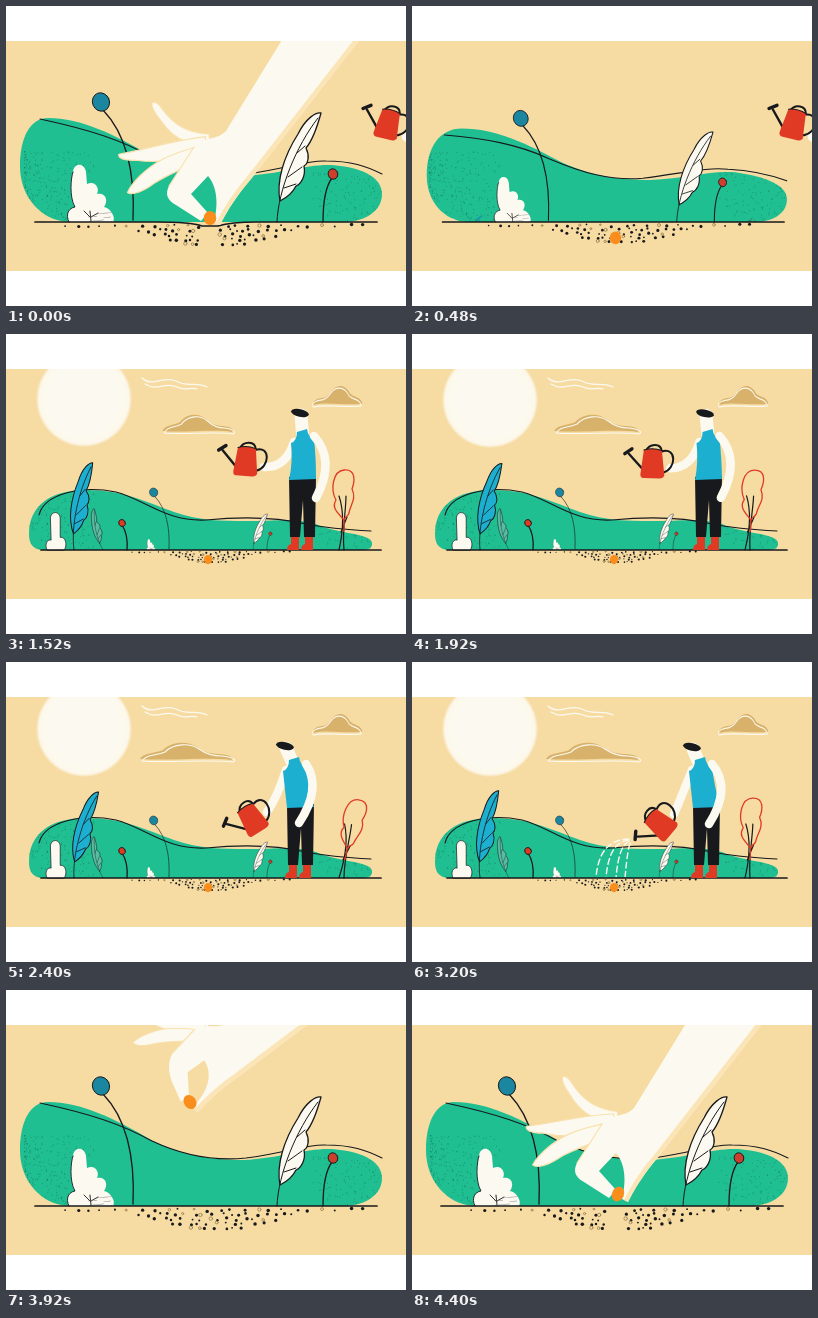
An HTML page with a canvas for the animation above (4480 ms loop, 400x300 px).

```html
<!DOCTYPE html>
<html lang="en">
<head>
<meta charset="utf-8">
<title>Planting a seed</title>
<style>
html, body { margin: 0; width: 100%; height: 100%; overflow: hidden; background: #fff; }
canvas { display: block; width: 400px; height: 300px; }
</style>
</head>
<body>
<canvas id="stage" width="400" height="300"></canvas>
<script>
const c = document.getElementById('stage').getContext('2d');
const LOOP = 4480, CUT = 3600, GROUND = 216, TOP = 35, BOTTOM = 265;
const SAND = '#f6dba2', GREEN = '#20bf92', INK = '#17191c', CREAM = '#fcfaf0',
      RED = '#e03a25', BLUE = '#1cafcf', ORANGE = '#f98e1d', TAN = '#d8b26b';

let seed = 7;
const rnd = () => (seed = seed * 16807 % 2147483647) / 2147483647;
const lerp = (a, b, k) => a + (b - a) * k;

// Eased value at time t from pairs of time and value
function track(t, ...keys) {
  let i = 0;
  while (i < keys.length - 2 && t >= keys[i + 2]) i += 2;
  if (t <= keys[0]) return keys[1];
  if (i >= keys.length - 2) return keys[keys.length - 1];
  const u = (t - keys[i]) / (keys[i + 2] - keys[i]);
  return lerp(keys[i + 1], keys[i + 3], u * u * (3 - 2 * u));
}
const pose = (t, a, b, d, e) => track(t, 880, a, 1440, b, 1840, b, 2320, d, 2560, d, 2880, e);

// Blend two path strings of equal structure
function blend(a, b, k) {
  const n = /-?\d+(\.\d+)?/g, to = b.match(n);
  let i = 0;
  return a.replace(n, v => lerp(+v, +to[i++], k).toFixed(2));
}
function shape(d, fill, stroke, width = 1.2) {
  const p = new Path2D(d);
  if (fill) { c.fillStyle = fill; c.fill(p); }
  if (stroke) { c.strokeStyle = stroke; c.lineWidth = width; c.stroke(p); }
}
function oval(x, y, rx, ry, fill, stroke, turn = 0, width = 1) {
  c.beginPath();
  c.ellipse(x, y, rx, ry, turn, 0, 7);
  if (fill) { c.fillStyle = fill; c.fill(); }
  if (stroke) { c.strokeStyle = stroke; c.lineWidth = width; c.stroke(); }
}
function at(x, y, size, deg, draw) {
  c.save();
  c.translate(x, y);
  c.rotate(deg * Math.PI / 180);
  c.scale(size, size);
  draw();
  c.restore();
}
function clipped(x, y, w, h, draw) {
  c.save();
  c.beginPath();
  c.rect(x, y, w, h);
  c.clip();
  draw();
  c.restore();
}

const HILL = [
  'M14 160 C14 132 24 112 42 112 C75 112 110 129 145 150 C180 167 210 170 237 170 C275 168 300 158 326 159 C362 162 376 174 376 188 C376 206 358 216 336 216 L62 216 C34 214 14 190 14 160Z',
  'M23 200 C23 172 44 156 80 156 C118 156 140 168 168 178 C195 187 215 187 240 187 C270 187 290 184 310 190 C330 200 366 199 366 209 C366 214 364 216 355 216 L38 216 C27 216 23 210 23 200Z'];
const RIDGE = [
  'M34 113 C85 124 115 134 146 151 C180 167 210 171 240 168 C280 163 300 154 320 155 C345 155 360 160 376 168',
  'M33 181 C38 160 75 151 110 158 C140 166 160 188 200 186 C240 182 270 183 300 190 C325 195 345 196 365 197'];
const PALM = [
  'M396 -165 L505 -165 L247 166 C234 181 224 196 216 212 L210 209 C214 192 214 175 204 163 L187 181 L204 200 L197 208 L172 192 C163 187 161 181 165 173 L190 134 C198 124 214 127 222 118Z',
  'M396 -165 L505 -165 L247 166 C234 181 224 196 216 212 L210 209 C220 190 222 172 209 160 L196 176 L204 200 L197 206 L184 190 C176 180 174 168 177 160 L191 134 C198 124 214 127 222 118Z'];

const grains = Array.from({ length: 420 }, (_, i) => {
  const edge = rnd() ** 2 * 70;
  return i % 3 ? [18 + edge, 145 + rnd() * 70] : [376 - edge, 165 + rnd() * 50];
});
// Rows of soil narrow with depth
const soil = [];
for (let row = 0; row < 5; row++) {
  const half = row ? 94 - row * 16 : 155, step = row ? 9 : 13;
  for (let x = 212 - half; x < 212 + half; x += step) {
    soil.push({ x: x + rnd() * 6 - 3, y: GROUND + 4 + row * 4.6 + rnd() * 3 - 1.5, r: .9 + rnd() * .9, ring: rnd() < .16 });
  }
}

function drawHill(wide, t) {
  const k = wide ? track(t, 320, 0, 800, .9, 960, .9, 1360, 1) : 0;
  const stretch = wide ? track(t, 400, 1, 800, 1.07, 960, 1.07, 1360, 1) : 1;
  c.save();
  c.translate(200, 0);
  c.scale(stretch, 1);
  c.translate(-200, 0);
  const d = blend(...HILL, k);
  shape(d, GREEN);
  c.save();
  c.clip(new Path2D(d));
  c.fillStyle = 'rgba(10,80,65,.42)';
  for (const [x, y] of grains) c.fillRect(x, y, .9, .9);
  c.restore();
  shape(blend(...RIDGE, k), null, INK, 1.1);
  c.restore();
}

function drawSoil(k, t) {
  const zoom = lerp(1, .53, k), shift = lerp(0, 94.7, k);
  const dip = t < CUT ? track(t, 160, 4, 440, 0) : track(t, 4400, 0, 4480, 4);
  const gap = t < CUT ? track(t, 200, 9, 520, 2) : track(t, 4160, 0, 4400, 9);
  const left = lerp(29, 35, k), right = lerp(371, 375, k);
  shape(`M${left} 216 L150 216 Q185 216 196 ${216 + dip} L212 ${216 + dip} Q225 216 250 216 L${right} 216`, null, INK, 1.7);
  for (const s of soil) {
    const off = s.x - 204;
    const x = s.x + Math.sign(off) * gap * Math.max(0, 1 - Math.abs(off) / 50);
    const y = GROUND + (s.y - GROUND) * zoom, r = s.r * lerp(1, .62, k);
    if (s.ring) oval(x * zoom + shift, y, r, r, null, '#8b7144', 0, .7);
    else oval(x * zoom + shift, y, r, r, INK);
  }
}

function bush() {
  shape('M-22 0 C-26 -8 -22 -14 -16 -15 C-22 -25 -20 -45 -18 -50 C-17 -59 -7 -60 -5 -50 L-4 -38 C4 -42 9 -34 6 -28 C14 -30 18 -22 13 -15 C20 -14 25 -4 22 0Z', CREAM);
  shape('M-22 0 C-26 -8 -22 -14 -16 -15 C-22 -25 -20 -45 -18 -50 M0 -1 L-1 -11 M-1 -5 L-7 -11 M0 -5 L7 -9', null, INK, .9);
  c.fillStyle = '#777';
  for (let i = 0; i < 45; i++) c.fillRect(20 - (i * 7.3 % 23), -1 - (i * 3.7 % 11), .7, .7);
}
function bloom(stem, x, y, r, color) {
  shape(stem, null, INK, 1.3);
  oval(x, y, r, r * 1.1, color, INK, -.4);
}
function quill(fill) {
  shape('M3 -21 C-1 -41 7 -66 21 -88 C29 -104 39 -110 44 -109 C41 -98 35 -81 29 -74 C33 -66 31 -58 27 -56 C29 -46 24 -38 19 -36 C15 -28 9 -24 3 -21Z', fill, INK, 1.3);
  shape('M0 0 C1 -31 19 -76 41 -104 M11 -45 L25 -55 M20 -69 L28 -76 M7 -34 L19 -38', null, INK, 1);
}

function drawPlants(k) {
  const plant = (x0, x1, size, draw) => at(lerp(x0, x1, k), GROUND, lerp(1, size, k), 0, draw);
  plant(85, 145, .19, bush);
  plant(127, 163, .48, () => bloom('M0 -2 C2 -46 -5 -86 -30 -112', -32, -120, 8.5, '#1b86a0'));
  plant(271, 247, .33, () => quill(CREAM));
  plant(317, 261, .34, () => bloom('M0 0 C0 -21 3 -36 9 -44', 10, -48, 4.8, '#cc3f2c'));
}

function drawSky(t) {
  const y = track(t, 560, 235, 1000, 140, 1440, 65, 2400, 67), x = track(t, 640, 62, 1440, 78);
  const glow = c.createRadialGradient(x, y, 36, x, y, 48);
  glow.addColorStop(0, CREAM);
  glow.addColorStop(.75, 'rgba(253,250,240,.92)');
  glow.addColorStop(1, 'rgba(253,250,240,.1)');
  clipped(0, TOP, 400, 165, () => oval(x, y, 48, 48, glow));

  const cloud = (x, y, w, h) => {
    c.save();
    c.translate(x, y);
    c.scale(w, h);
    const d = 'M-48 7 C-44 0 -34 2 -25 -2 C-16 -11 0 -11 9 -5 C16 0 22 2 32 2 C42 3 48 6 43 8 C20 5 -20 9 -48 7Z';
    shape(d, TAN);
    c.translate(2, 2);
    shape(d, null, CREAM, 1.1);
    c.restore();
  };
  const w = track(t, 880, 1.06, 1520, .76, 2200, 1);
  cloud(228 - 46 * w, track(t, 400, 0, 880, 81, 1440, 90), w, 1);
  cloud(track(t, 880, 339, 1440, 331), track(t, 400, 0, 880, 52, 1440, 62), -.53, 1.1);
  at(track(t, 880, 0, 1440, 2), track(t, 400, -40, 880, -11, 1440, 0), 1, 0, () =>
    shape('M134 44 C145 54 155 41 168 47 C180 54 188 47 199 53 M137 50 C150 58 157 47 169 53 C177 57 183 53 189 55', null, CREAM, 1.2));
}

function drawGarden(t) {
  const grow = track(t, 400, 0, 800, 1);
  if (!grow) return;
  const lean = track(t, 480, 35, 880, 24, 1360, 0);
  at(track(t, 880, 41, 1360, 50), GROUND, .7 * grow, 0, () => {
    shape('M-13 0 C-17 -10 -11 -16 -7 -14 L-8 -46 C-7 -56 5 -56 6 -46 L6 -18 C13 -20 17 -8 12 0Z', CREAM, INK, 1);
  });
  at(track(t, 880, 63, 1360, 68), GROUND, .76 * grow, lean - 8 + 2 * Math.sin(t / 300), () => quill(BLUE));
  at(track(t, 880, 80, 1360, 97), GROUND, .36 * grow, lean - 34, () => quill('#58bea2'));
  at(track(t, 880, 107, 1360, 121), GROUND, grow, lean * .6, () =>
    bloom('M0 0 C1 -12 -1 -19 -5 -25', -5, -27, 3.2, RED));
  const sway = track(t, 480, 100, 880, 75, 1520, 0, 2000, 4, 2400, 13, 2900, 2);
  at(336, GROUND, grow, sway * .45, () => {
    shape('M-3 0 C1 -18 3 -36 -3 -54 M2 0 C0 -20 4 -40 4 -54 M-1 -18 L5 -33', null, INK, 1.2);
    at(1, -27, 1, sway * .55, () =>
      shape('M1 -3 C-5 -10 -12 -15 -7 -23 C-13 -34 -10 -52 1 -53 C13 -54 12 -42 9 -34 C14 -24 7 -18 6 -10 C5 -6 2 -7 1 -3 L1 8', null, RED, 1.3));
  });
}

function drawCan(x, y, deg) {
  at(x, y, 1, deg, () => {
    shape('M9 -12 C24 -17 24 5 11 9 M-7 -12 C-4 -20 8 -21 9 -12', null, INK, 2);
    shape('M-9 7 L-24 -9', null, INK, 2.4);
    shape('M-28 -9 L-21 -14', null, INK, 3.4);
    shape('M-9 -13 Q0 -16 9 -13 L12 12 Q11 15 7 15 L-9 15 Q-12 15 -12 11Z', RED);
    shape('M-9 -13 Q0 -16 9 -13', null, INK, 1);
  });
}

function limb(x, y, ex, ey, hx, hy) {
  shape(`M${x} ${y} Q${ex} ${ey} ${hx} ${hy}`, null, CREAM, 8.5);
}

function drawMan(t) {
  const p = (...v) => pose(t, ...v);
  const hx = p(265, 295, 282, 283), hy = p(88, 81, 86, 87), sx = p(287, 296, 290, 290);
  c.save();
  c.translate(track(t, 480, 150, 880, 1, 1440, 0, 2000, 0, 2400, -2), 0);
  shape('M285 201 L293 201 L293 216 L281 216 Q281 211 285 210Z M299 201 L307 201 L307 216 L295 216 Q295 211 299 210Z', RED);
  shape('M283 143 L310 142 L309 203 L298 203 L297 166 L294 203 L284 203Z', INK);
  shape(`M${sx + 1} 106 L${hx} ${hy}`, null, CREAM, 13);
  oval(hx - 1, hy - 2, 9, 3.8, INK, null, .2);
  limb(sx - 8, 108, p(266, 280, 273, 271), p(142, 134, 136, 136), p(250, 258, 263, 264), p(131, 133, 150, 152));
  shape(`M${sx - 11} 109 Q${sx - 5} 107 ${sx - 5} 98 L${sx + 5} 95 Q${sx + 6} 103 ${sx + 12} 105 Q${sx + 14} 122 310 145 L283 146 Q${sx - 9} 128 ${sx - 11} 109Z`, BLUE);
  limb(sx + 12, 102, p(310, 330, 318, 322), p(130, 126, 126, 126), p(266, 310, 295, 299), p(152, 164, 161, 162));
  drawCan(p(232, 240, 248, 250), p(118, 127, 157, 162), p(14, 4, -32, -50));
  c.restore();
}

function drawWater(t) {
  const flow = track(t, 2640, 0, 2960, 1);
  if (!flow) return;
  clipped(175, 172, 50, 43 * flow, () => {
    c.setLineDash([6, 3.5]);
    c.lineDashOffset = -t * .06;
    [184, 194, 204, 213].forEach((x, i) =>
      shape(`M219 ${177 + i} Q${x + 3} ${176 + i * 2} ${x} 216`, null, CREAM, 1.4));
  });
}

// The pinch point sits at x, y; open runs from a closed to a raised grip
function drawHand(x, y, open, curl) {
  const edge = '#f9e1ae';
  at(x, y, 1, 15 * open, () => {
    c.translate(-206, -204);
    at(198, 130, lerp(1, .78, open), curl, () => {
      c.translate(-198, -130);
      shape('M206 128 C185 133 170 122 160 103 C155 95 152 88 153 84 C157 82 160 86 163 92 C172 108 184 118 206 122Z', CREAM, edge);
      shape('M202 140 C170 146 145 143 130 139 C118 138 113 135 114 131 C140 130 165 124 202 124Z', CREAM, edge);
      shape('M200 145 C180 152 160 157 146 164 C134 171 122 174 118 170 C124 160 140 148 155 142 C170 136 185 134 200 132Z', CREAM, edge);
    });
    const palm = blend(...PALM, open);
    shape(palm, CREAM);
    c.save();
    c.clip(new Path2D(palm));
    shape('M505 -165 L247 166 C234 181 224 196 216 212', null, '#fbe4b6', 9);
    c.restore();
    shape(blend('M165 173 L190 134', 'M177 160 L191 134', open), null, edge);
  });
}

function frame(t) {
  const close = t >= CUT;
  const k = close ? 0 : track(t, 320, 0, 800, 1);
  c.fillStyle = '#fff';
  c.fillRect(0, 0, 400, 300);
  clipped(0, TOP, 400, BOTTOM - TOP, () => {
    c.lineCap = c.lineJoin = 'round';
    c.fillStyle = SAND;
    c.fillRect(0, TOP, 400, BOTTOM - TOP);
    if (!close) drawSky(t);
    drawHill(!close, t);
    if (!close) drawGarden(t);
    drawPlants(k);
    drawSoil(k, t);

    if (close) {
      const x = track(t, CUT, 178, 3920, 184, 4400, 206, 4480, 204);
      const y = track(t, CUT, 10, 3920, 112, 4400, 204, 4480, 211);
      drawHand(x, y, track(t, 3920, 1, 4400, 0), track(t, 4320, 0, 4480, -7));
      oval(x, y, 6, 7.5, ORANGE, null, track(t, 3920, -.6, 4400, .4));
    } else {
      drawMan(t);
      drawWater(t);
      const lift = track(t, 80, 0, 480, 1);
      if (lift < 1) drawHand(204 + 35 * lift, 211 - 235 * lift, lift, -7);
      const depth = track(t, 0, 212, 320, 234) - GROUND;
      oval(lerp(204, 202, k), GROUND + depth * lerp(1, .53, k), lerp(6.3, 4.1, k), lerp(7, 4.6, k), ORANGE);
    }
  });
}

const start = performance.now();
function run() {
  frame((performance.now() - start) % LOOP);
  requestAnimationFrame(run);
}
run();
</script>
</body>
</html>
```
